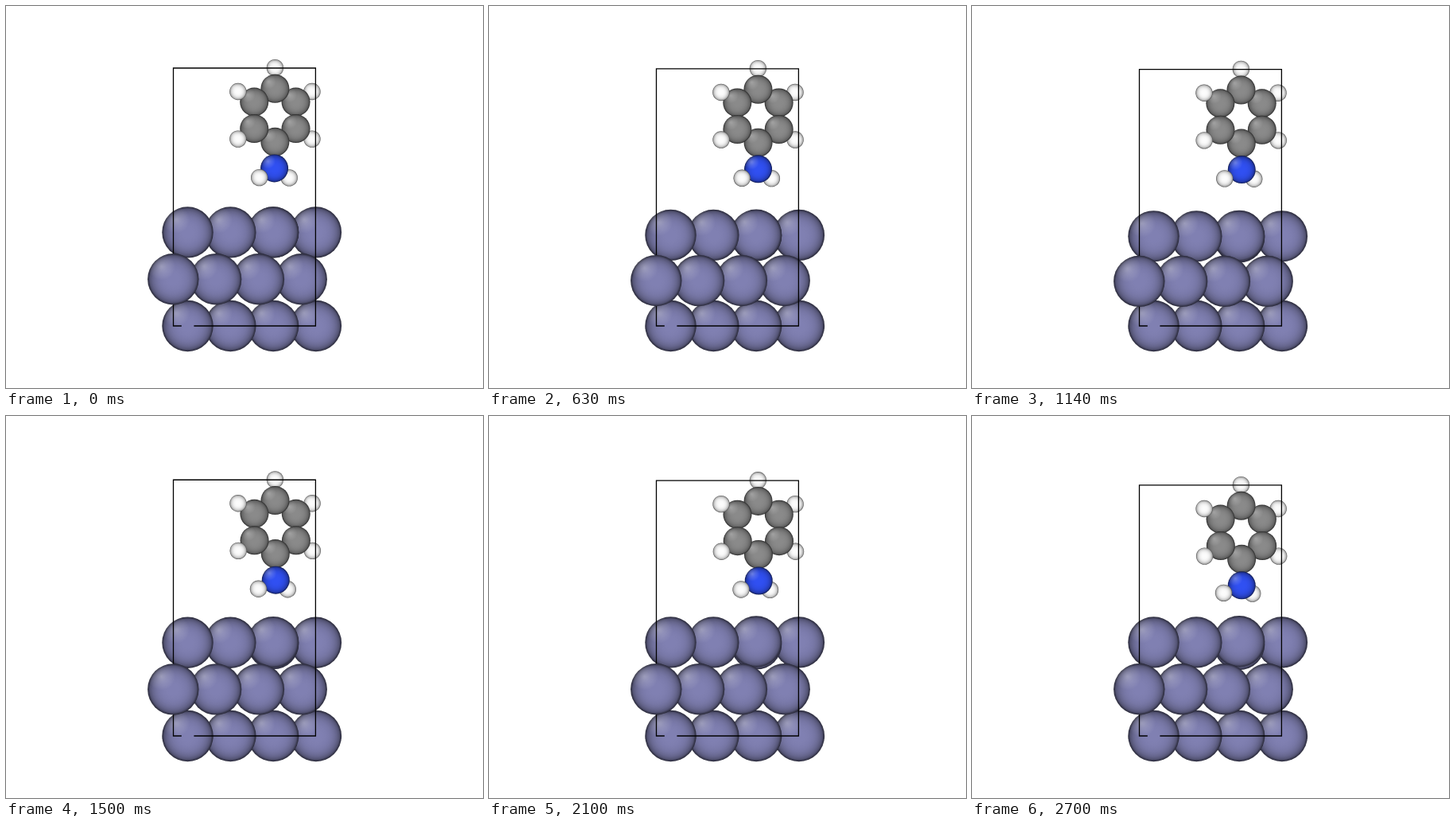
Write an HTML page that moves like this. It is 600 by 480 pixels and loops after 2.76 s.

```html
<!DOCTYPE html>
<html lang="en">
<head>
<meta charset="utf-8">
<style>
html, body { margin: 0; width: 100%; height: 100%; overflow: hidden; background: #fff; }
svg { display: block; width: 600px; height: 480px; }
</style>
</head>
<body>
<svg id="stage" viewBox="0 0 600 480" width="600" height="480"><defs id="defs"></defs></svg>
<script>
const NS = 'http://www.w3.org/2000/svg';
const stage = document.getElementById('stage');
const defs = document.getElementById('defs');
const LOOP = 2760, STEP = 30, LAST = 2700;

function el(name, attrs, parent = stage) {
  const node = document.createElementNS(NS, name);
  for (const k in attrs) node.setAttribute(k, attrs[k]);
  return parent.appendChild(node);
}

// Shaded spheres: body colour darkening to the rim, soft light from the upper left
const KINDS = {
  zinc: { r: 32.2, rgb: [128, 128, 178] },
  carbon: { r: 18, rgb: [138, 138, 138] },
  nitrogen: { r: 17.5, rgb: [48, 80, 242] },
  hydrogen: { r: 10.7, rgb: [252, 252, 252] }
};

function gradient(id, attrs, stops) {
  const g = el('radialGradient', { id, ...attrs }, defs);
  for (const [offset, color, opacity] of stops)
    el('stop', { offset, 'stop-color': color, 'stop-opacity': opacity }, g);
}

for (const kind in KINDS) {
  const stops = [];
  for (let i = 0; i <= 10; i++) {
    const d = i / 10;
    const light = .3 + .7 * Math.sqrt(1 - d ** 3);
    stops.push([d, `rgb(${KINDS[kind].rgb.map(c => Math.round(c * light))})`, 1]);
  }
  gradient(kind, { cx: .5, cy: .5, r: .5 }, stops);
}
gradient('shine', { cx: .27, cy: .25, r: .27 }, [[0, '#fff', .3], [.4, '#fff', .16], [1, '#fff', 0]]);

const atoms = [];
function add(kind, x, y) {
  const node = el('g', {}), r = KINDS[kind].r;
  el('circle', { r, fill: `url(#${kind})` }, node);
  el('circle', { r, fill: 'url(#shine)' }, node);
  atoms.push({ node, x, y });
}

// Motion rules, s in seconds
const swell = s => Math.exp(-(((s - .96) / .42) ** 4));
const sink = s => 1.5 * s + 8.2 * Math.max(0, s - 2.1);
const topY = s => 284.4 + 5.1 * swell(s);
const midY = s => 343.2 + 2.8 * swell(s);

// Slab, far atoms first; the middle layer lies nearest
const column = (x, i) => () => x + 53.8 * i;
for (let i = 3; i >= 0; i--) {
  const x = column(228.5, i);
  add('zinc', x, () => 402);
  if (i === 2) {
    add('zinc', x, s => topY(s) + .95 * s);
    add('zinc', x, s => topY(s) - .4 * s);
  } else {
    add('zinc', x, topY);
  }
}
for (let i = 3; i > 0; i--) add('zinc', column(210.3, i), midY);

// Ring position k counts clockwise from the top; lower atoms drift right
function ringAtom(kind, k, scale) {
  const a = k * Math.PI / 3;
  const x = 338.4 + 30.2 * scale * Math.sin(a);
  const y = 137.3 - 33.5 * scale * Math.cos(a);
  add(kind, s => x + .003 * (y - 78) * s, s => y + sink(s));
}
const OUTER = 1.78;
for (const k of [0, 1, 2]) ringAtom('hydrogen', k, OUTER);
add('hydrogen', s => 356.2 - 1.3 * s, s => 215.9 + .8 * sink(s));
for (const k of [1, 2, 0, 3, 5, 4]) ringAtom('carbon', k, 1);
add('nitrogen', s => 337.6 + 1.5 * Math.min(s, 1.1), s => 203.9 + sink(s));
add('hydrogen', s => 318.7 - .8 * s, s => 215.6 + .75 * sink(s));
for (const k of [5, 4]) ringAtom('hydrogen', k, OUTER);

const cell = el('path', { fill: 'none', stroke: '#000', 'stroke-width': 1.3 });

// The nearest atom covers the cell edge
add('zinc', column(210.3, 0), midY);

function draw(t) {
  const s = t / 1000;
  for (const a of atoms)
    a.node.setAttribute('transform', `translate(${a.x(s).toFixed(2)} ${a.y(s).toFixed(2)})`);
  const top = (78 + sink(s)).toFixed(2);
  cell.setAttribute('d', `M220.8 402H210.5V${top}H389.4V402H236.4`);
}

const start = performance.now();
function tick() {
  const t = (performance.now() - start) % LOOP;
  draw(Math.min(LAST, Math.floor(t / STEP) * STEP));
  requestAnimationFrame(tick);
}
tick();
</script>
</body>
</html>
```
